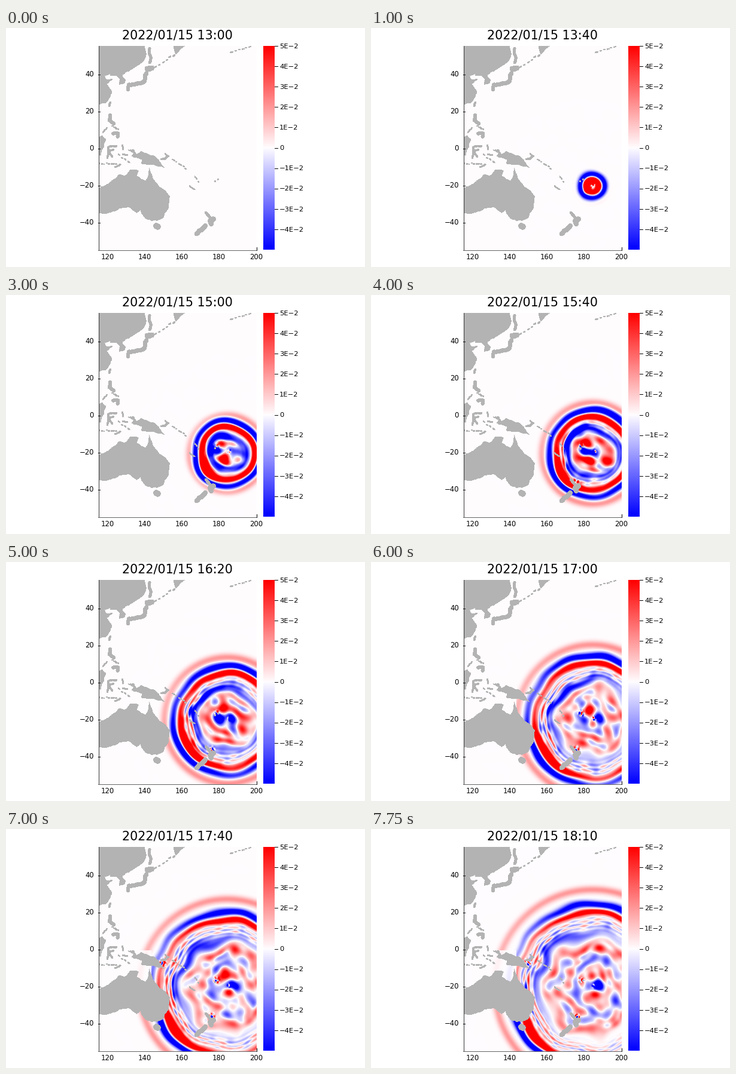
Write a matplotlib script that moves like this. It is 600x400 px and loops after 8000 ms.

```python
import numpy as np
import matplotlib.pyplot as plt
from matplotlib.animation import FuncAnimation
from matplotlib.colors import LinearSegmentedColormap

DPI = 100
FRAMES, INTERVAL = 32, 250
LEFT, RIGHT, TOP, BOTTOM = 155, 419, 30, 372
CX, CY = 370, 265            # wave centre in pixels
GREY = "#b3b3b3"

plt.rcParams["font.family"] = "DejaVu Sans"
cmap = LinearSegmentedColormap.from_list(
    "height", ["#0000ff", "#fffdff", "#ff0000"], N=512)
rng = np.random.default_rng(15)


def px(lon):
    return 170 + 3.1 * (lon - 120)


def py(lat):
    return 201.5 - 3.1 * lat


# Key points of the large coasts (longitude, latitude); rough() adds detail
COASTS = [
    # East Asia
    [(113, 56), (139.5, 56), (140.8, 51), (138.5, 46.5), (133, 42.8),
     (129.7, 41.2), (127.5, 39.6), (129.4, 37), (129, 35.2), (126.4, 34.6),
     (126.6, 37.6), (125, 39.5), (121.5, 39.2), (121.5, 40.8), (118, 39),
     (119, 37.3), (122.5, 37.2), (119.4, 35), (121.9, 31.2), (121.3, 28.2),
     (118.5, 24.5), (113, 21.8)],
    # Australia
    [(113, -34), (113, -21.8), (119, -20), (122.3, -17.5), (126, -14.2),
     (129, -15), (132, -11.6), (136.6, -12.2), (135.7, -15), (140.5, -17.6),
     (142.4, -10.8), (143.8, -14.3), (146.2, -18.8), (150, -22.3),
     (153.3, -26), (152.7, -32), (150, -37.2), (146.3, -38.9),
     (140.8, -38), (138.2, -35), (137.7, -33), (135.6, -34.8),
     (131.3, -31.5), (126, -32.3), (123.5, -33.9), (117, -35)],
    # New Guinea
    [(131, -.8), (134, -.8), (135.3, -3.2), (138, -1.7), (144.5, -3.9),
     (147.5, -6.3), (150.6, -10.4), (147, -9.5), (143.5, -8.6),
     (138.3, -8.2), (138.3, -5.7), (133, -4), (134, -2.4)],
    # Borneo
    [(113, -3.5), (116, -3.8), (117.8, .8), (118.8, 5), (117, 6.8),
     (113, 4)],
    # Kamchatka
    [(155.5, 56), (162, 56), (158.3, 52.5), (156.8, 51)],
]

# Islands as a line width in pixels and the points of a spine
ISLANDS = [
    (4, [(142.6, 54), (143, 50), (142.6, 46.3)]),
    (8, [(141.3, 43), (143.7, 43.4)]),
    (6, [(131.5, 34.4), (136.5, 35.3), (139.7, 36.2), (140.9, 40.6)]),
    (5, [(130.8, 33), (130.9, 31.8)]),
    (3, [(121.3, 24.7), (120.8, 22.9)]),
    (5, [(121.3, 18), (120.9, 15.2), (123.3, 13.3)]),
    (5, [(123, 8), (125.6, 8), (125.3, 6.3)]),
    (1.5, [(117.4, 8.5), (119.5, 11)]),
    (2.5, [(124.6, 1.2), (120.3, .6), (120.2, -2.5), (119.8, -5.2)]),
    (2.5, [(123, -.8), (120.4, -1.6), (122.4, -4.6)]),
    (2, [(127.9, 1.6), (128.2, -.5)]),
    (2, [(128.2, -3.3), (130.5, -3.5)]),
    (2, [(123.9, -10), (126.8, -8.7)]),
    (2.5, [(148.8, -5.8), (150.8, -5.8), (152, -4.5)]),
    (1.5, [(150.9, -2.8), (152.8, -4.2)]),
    (9, [(146.2, -41.8), (147, -42.3)]),
    (4, [(173, -34.8), (175, -37)]),
    (8, [(176.9, -38.2), (175.4, -39), (175.8, -40.6)]),
    (7, [(172.6, -41.8), (170.5, -44), (168, -46)]),
    (1.3, [(164.2, -20.3), (166.9, -22.2)]),
]

# Island chains: first end, last end, number of islets
CHAINS = [
    ((146, 44.2), (155.5, 50.3), 6), ((187, 52), (197, 54.8), 6),
    ((122, 12.4), (125.4, 10.6), 6), ((115.5, -8.4), (124.5, -8.4), 8),
    ((126.5, -3.4), (131.5, -7.4), 4), ((154.8, -5.9), (162, -10.6), 7),
    ((167, -15.2), (168.6, -18), 3), ((177.6, -17.9), (179.4, -16.6), 2),
]


def rough(points, closed, depth=3):
    """Fractal coastline: push every midpoint sideways."""
    p = np.array(points, float)
    if closed:
        p = np.vstack([p, p[:1]])
    for _ in range(depth):
        step = np.diff(p, axis=0)
        push = rng.uniform(-.11, .11, (len(step), 1))
        mid = p[:-1] + step / 2 + push * step[:, ::-1] * [-1, 1]
        p = np.insert(p, np.arange(1, len(p)), mid, axis=0)
    return px(p[:, 0]), py(p[:, 1])


# Pixel grid in polar form around the wave centre
X, Y = np.meshgrid(np.arange(LEFT, RIGHT) + .5, np.arange(TOP, BOTTOM) + .5)
DX, DY = X - CX, CY - Y
R = np.hypot(DX, DY)
ANGLE = np.arctan2(DY, DX)


def bump(d, width):
    return np.exp(-(d / width) ** 2)


def toward(angle, width):
    """Weight of the directions close to one angle."""
    d = (ANGLE - angle + np.pi) % (2 * np.pi) - np.pi
    return bump(d, width)


def make_waves(count, short, long):
    k = 2 * np.pi / rng.uniform(short, long, count)
    a = rng.uniform(0, 2 * np.pi, count)
    phase = rng.uniform(0, 2 * np.pi, count)
    speed = rng.uniform(-.03, .03, count)
    return list(zip(k * np.cos(a), k * np.sin(a), phase, speed))


def noise(waves, t):
    total = sum(np.cos(kx * X + ky * Y + p + w * t) for kx, ky, p, w in waves)
    return total * np.sqrt(2 / len(waves))


BLOBS = make_waves(20, 20, 44)
BENDS = make_waves(10, 45, 100)
STREAKS = make_waves(10, 14, 40)
SPECKS = make_waves(10, 5, 9)

WEST = toward(np.pi, .9)
NORTHWEST = toward(2.75, .75)
SOUTHWEST = toward(-2.5, .4)
SOUTH = toward(-1.4, .6)
SHELF = np.where((X < 243) & (Y > 203) & (Y < 262), .15, 1)
SHORES = [(352, 253, 4), (373, 262, 3), (343, 315, 5), (262, 224, 5)]


def field(t):
    """Scaled wave height t minutes after the start."""
    if t == 0:
        return np.zeros_like(R)
    age = t / 310
    bend = noise(BENDS, t)
    streak = noise(STREAKS, t)
    outer = R + (.4 + age) * bend
    inner = R + (1 + 4 * age) * bend
    fade = 1 - .75 * age * (NORTHWEST + SOUTH) + .4 * SOUTHWEST

    # leading crest, trough and main crest
    z = .42 * bump(R - .527 * t, 6.5) * (1 - .3 * NORTHWEST)
    z -= fade * (1.9 - .5 * age) * bump(outer - 2.5 - .44 * t, 5.5)
    z += fade * (2.1 - .6 * age) * bump(outer + 6 - .425 * t,
                                        6 - 1.5 * age + 3 * SOUTHWEST)

    # slower trough and crest, strongest in the north-west as they age
    side = 1 - age * (1 - toward(2.4, 1.1))
    z -= side * (2.1 - 1.3 * age) * bump(inner + 13 - .345 * t, 5 + 4 * age)
    z += (.8 - .5 * age) * bump(inner + 19 - .29 * t, 5 + 5 * age)
    z += (.8 - .4 * age) * WEST * bump(inner - .33 * t, 3)

    # broken ripples trailing the main crest
    grow = np.clip((t - 90) / 80, 0, 1)
    ripple = np.cos(2 * np.pi * (outer - .41 * t) / 7) + .6 * streak
    z += grow * (.2 + .25 * WEST) * ripple * bump(outer + 14 - .395 * t, 10)

    # scattered arcs, strongest around the centre
    core = 1 / (1 + np.exp((inner - .25 * t + 4) / 4))
    arcs = np.cos(2 * np.pi * (inner - .25 * t) / 28 + .8 * bend)
    strength = .25 + (.75 - .45 * age) * bump(R, 32)
    z += core * strength * (noise(BLOBS, t) + .7 * arcs)

    specks = noise(SPECKS, 4 * t)
    for x, y, size in SHORES:
        if t > np.hypot(x - CX, y - CY) / .42:
            z += 1.2 * bump(np.hypot(X - x, Y - y), size) * specks
    return z * SHELF


fig = plt.figure(figsize=(600 / DPI, 400 / DPI), dpi=DPI, facecolor="white")
ax = fig.add_axes([0, 0, 1, 1])
ax.axis("off")


def label(x, y, text, size=11.6, ha="center"):
    return ax.text(x, y + .365 * size, text, fontsize=size * 72 / DPI,
                   ha=ha, va="baseline", color="black")


def line(x0, y0, x1, y1, color="black"):
    ax.plot([x0, x1], [y0, y1], color=color, lw=72 / DPI,
            solid_capstyle="butt", antialiased=False, zorder=4)


def coast(points):
    shape, = ax.fill(*rough(points, True), facecolor=GREY, lw=0,
                     antialiased=False, zorder=3)
    shape.set_clip_path(frame)


def island(width, points):
    spine, = ax.plot(*rough(points, False), color=GREY, lw=width * 72 / DPI,
                     solid_capstyle="round", solid_joinstyle="round",
                     antialiased=False, zorder=3)
    spine.set_clip_path(frame)


def chain(first, last, count):
    first, last = np.array(first), np.array(last)
    for s in np.linspace(0, 1, count):
        spot = first + s * (last - first) + rng.normal(0, .25, 2)
        half = (last - first) / count * rng.uniform(.1, .3)
        island(rng.uniform(1, 1.8), [spot - half, spot + half])


sea = ax.imshow(np.zeros_like(R), cmap=cmap, vmin=-1, vmax=1, aspect="auto",
                interpolation="nearest", zorder=1,
                extent=(LEFT, RIGHT, BOTTOM, TOP))
ax.imshow(np.linspace(1, -1, 341)[:, None], cmap=cmap, vmin=-1, vmax=1,
          aspect="auto", interpolation="nearest",
          extent=(430, 449, 371, 30))
ax.set_xlim(0, 600)
ax.set_ylim(400, 0)

frame = plt.Rectangle((LEFT, TOP), RIGHT - LEFT, BOTTOM - TOP,
                      transform=ax.transData)
for points in COASTS:
    coast(points)
for width, points in ISLANDS:
    island(width, points)
for ends in CHAINS:
    chain(*ends)

line(154.5, TOP, 154.5, BOTTOM, "#333333")
line(154, 371.5, RIGHT, 371.5, "#666666")
line(418.5, 367, 418.5, BOTTOM)
for lon in range(120, 201, 20):
    label(px(lon), 383, str(lon))
for lat in range(-40, 41, 20):
    label(147, py(lat) - .6, str(lat).replace("-", "\u2212"), ha="right")
    line(154, py(lat), 157, py(lat))

for n in range(-4, 6):
    y = 200.5 - 34.07 * n
    text = f"{n}E-2" if n else "0"
    label(457.2, y - .4, text.replace("-", "\u2212"), 11.5, "left")
    line(449, y, 454, y)

title = label(286.5, 10.6, "", 20.7)


def update(i):
    minutes = 10 * i
    sea.set_data(field(minutes))
    title.set_text(f"2022/01/15 {13 + minutes // 60}:{minutes % 60:02d}")
    return sea, title


anim = FuncAnimation(fig, update, frames=FRAMES, interval=INTERVAL,
                     repeat=True, repeat_delay=0, blit=False)
plt.show()
```
